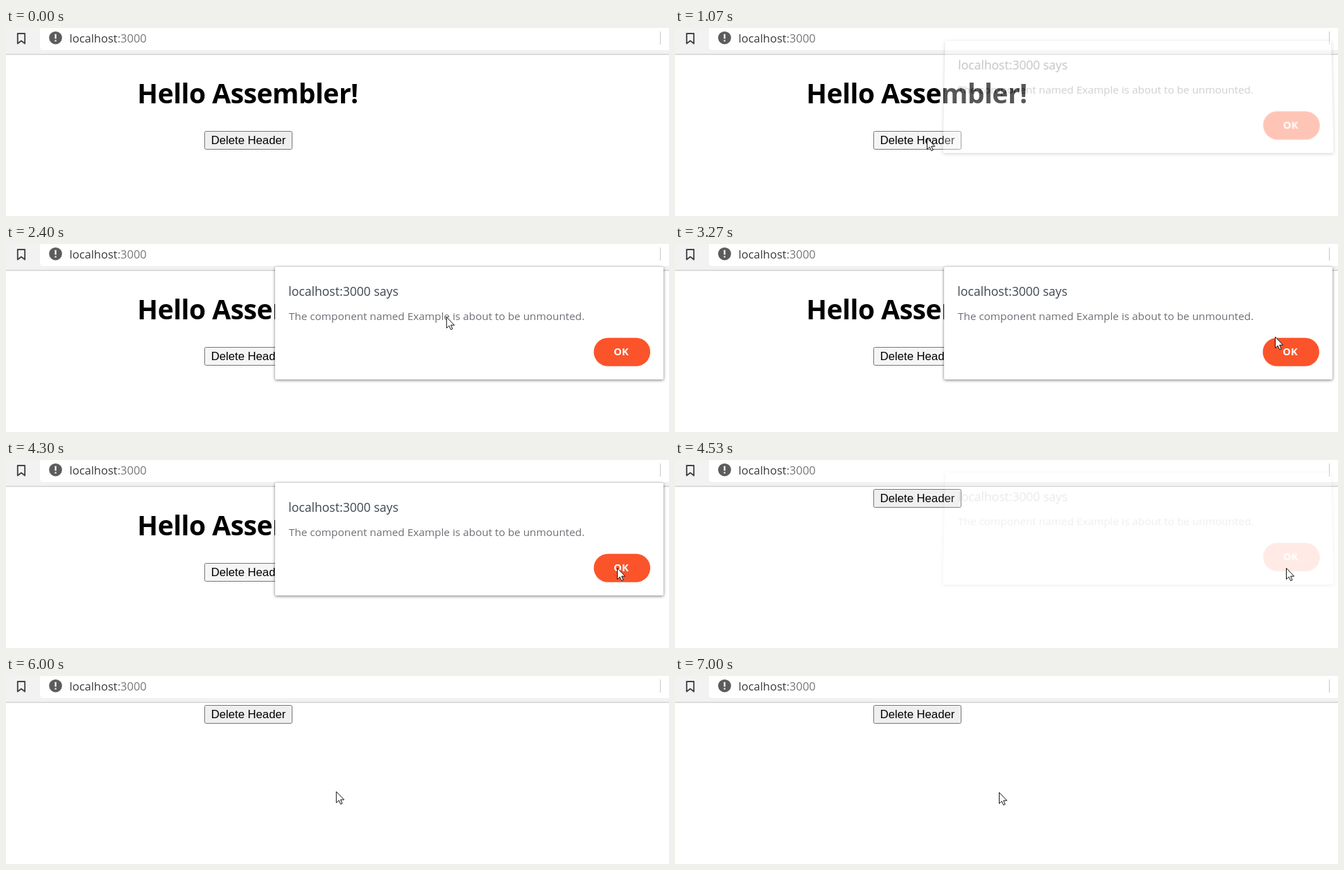
An HTML page for the animation above (7.03 s loop, 956x272 px).

```html
<!DOCTYPE html>
<html lang="en">
<head>
<meta charset="utf-8">
<title>Unmount alert</title>
<style>
  html, body { margin: 0; width: 100%; height: 100%; overflow: hidden; background: #fff; }
  svg { position: absolute; left: 0; top: 0; overflow: visible; }
  text { font-family: "Open Sans", "Noto Sans", sans-serif; white-space: pre; }
  #stage { position: absolute; left: 0; top: 0; width: 956px; height: 272px; overflow: hidden; }
  #heading { font-size: 39px; font-weight: 700; letter-spacing: -.5px; }
  #button text { font: 16.667px "Liberation Sans", Arial, sans-serif; }
  #dialog {
    position: absolute; left: 388px; top: 33px; width: 560px; height: 163px;
    background: #fff; border-radius: 2px; opacity: 0;
    box-shadow: 0 1px 4px rgba(0, 0, 0, .55);
  }
</style>
</head>
<body>
<div id="stage">
  <svg width="956" height="272">
    <!-- browser toolbar -->
    <rect width="956" height="38" fill="#f2f2f2"/>
    <rect x="49" y="-10" width="920" height="42" rx="5" fill="#fff"/>
    <rect y="37.5" width="956" height="1.5" fill="#d4d4d4"/>
    <path d="M943.5 5V24" stroke="#c8c8c8"/>
    <path d="M16.8 8H27.2V22.5L22 18.5L16.8 22.5Z" fill="none" stroke="#444" stroke-width="1.9" stroke-linejoin="round"/>
    <circle cx="71.5" cy="14.2" r="9.3" fill="#5c5c5c"/>
    <path d="M71.5 8.8V15.4M71.5 17.4V19.6" stroke="#fff" stroke-width="2.2"/>
    <text x="91.5" y="20.7" font-size="16.5" fill="#3a3a3a">localhost<tspan fill="#777">:3000</tspan></text>

    <!-- page -->
    <text id="heading" x="189.3" y="109">Hello Assembler!</text>
    <g id="button">
      <rect id="face" x="286.5" y="149.5" width="126" height="26" rx="2" stroke="#767676"/>
      <text x="295.8" y="168">Delete Header</text>
    </g>
  </svg>

  <div id="dialog">
    <svg width="560" height="163">
      <text x="19.3" y="41.8" font-size="17.6" fill="#3f4650">localhost:3000 says</text>
      <text x="19.8" y="77" font-size="15.35" fill="#6c7075">The component named Example is about to be unmounted.</text>
      <rect x="459.5" y="102.7" width="81.5" height="41" rx="20.5" fill="#fb542b"/>
      <text x="499" y="128.2" font-size="14.6" font-weight="700" fill="#fff" text-anchor="middle">OK</text>
    </svg>
  </div>

  <svg id="cursor" width="13" height="20">
    <path d="M.5 .5V16.6L4.2 13.2L6.7 18.7L9.1 17.6L6.7 12.2H11.7Z" fill="#fff" stroke="#111"/>
  </svg>
</div>
<script>
const LOOP = 7030;
const ENTER = 330, HOVER = 500, PRESS = 900, OPEN = 1030, CLOSE = 4330, UNMOUNT = 4370;

const { heading, button, face, dialog, cursor } =
  Object.fromEntries([...document.querySelectorAll('[id]')].map(el => [el.id, el]));

const ramp = (t, start, length) => Math.min(1, Math.max(0, (t - start) / length));
const easeOut = p => p * (2 - p);
const smooth = p => p * p * (3 - 2 * p);

// Each hand movement ends at a point; bow bends it upwards or downwards.
const entry = { x: 352, y: 268 };
const moves = [
  { start: ENTER, length: 300, x: 363, y: 159 },
  { start: 1515, length: 135, x: 352, y: 136 },
  { start: 1650, length: 580, x: 556, y: 98, bow: -14 },
  { start: 2270, length: 730, x: 797, y: 120 },
  { start: 3000, length: 270, x: 865, y: 134 },
  { start: 3530, length: 240, x: 881, y: 156 },
  { start: 5420, length: 680, x: 467, y: 168, bow: -14 },
];

function cursorAt(t) {
  let { x, y } = entry;
  for (const move of moves) {
    const p = easeOut(ramp(t, move.start, move.length));
    x += (move.x - x) * p;
    y += (move.y - y) * p + (move.bow ?? 0) * Math.sin(Math.PI * p);
  }
  return { x, y };
}

function faceColor(t) {
  if (t < HOVER || t >= UNMOUNT) return '#efefef';
  return t < PRESS ? '#e5e5e5' : '#f5f5f5';
}

function draw(t) {
  const { x, y } = cursorAt(t);
  cursor.style.transform = `translate(${x}px, ${y}px)`;
  cursor.style.opacity = t < ENTER ? 0 : 1;

  // The alert drops in from a slight backward tilt and leaves the same way.
  const away = 1 - smooth(ramp(t, OPEN, 240)) + smooth(ramp(t, CLOSE, 230));
  dialog.style.opacity = ramp(t, OPEN, 120) - ramp(t, CLOSE, 230);
  dialog.style.transform =
    `translateY(${-16.5 * away}px) perspective(1300px) rotateX(${6 * away}deg)`;

  const unmounted = t >= UNMOUNT;
  heading.style.opacity = unmounted ? 0 : 1;
  button.style.transform = `translateY(${unmounted ? -107 : 0}px)`;
  face.style.fill = faceColor(t);
}

const begin = performance.now();
function tick() {
  draw((performance.now() - begin) % LOOP);
  requestAnimationFrame(tick);
}
tick();
</script>
</body>
</html>
```
